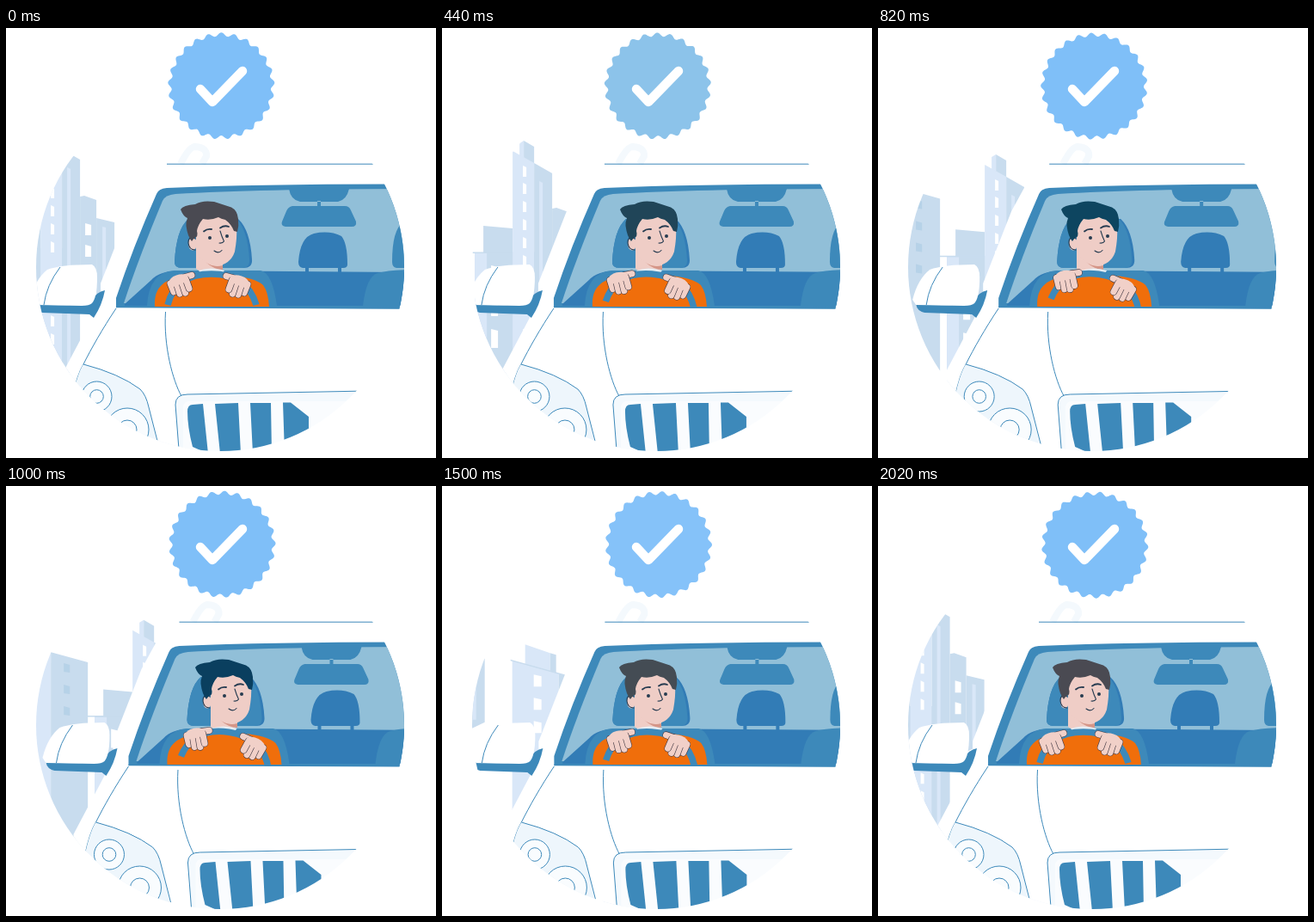
Animation, 500 px wide and 500 px high, one loop 2.04 s. Source, as an HTML page:

```html
<!DOCTYPE html>
<html lang="en">
<head>
<meta charset="utf-8">
<title>Verified driver</title>
<style>
  html, body { margin: 0; width: 100%; height: 100%; overflow: hidden; background: #fff; }
  svg { display: block; width: 100%; height: 100%; }
  .blue { fill: #3d89ba; }
  .deep { fill: #327cb6; }
  .light { fill: #d9e7f8; }
  .shade { fill: #c8dcee; }
  .skin { fill: #efcdc6; }
  .white { fill: #fff; }
  .line { fill: none; stroke: #3d89ba; stroke-width: 1; }
  .ink { fill: none; stroke: #263b50; stroke-width: 1.1; stroke-linecap: round; stroke-linejoin: round; }
  .brow { stroke-width: 1.8; }
</style>
</head>
<body>
<svg viewBox="0 0 500 500">
  <defs>
    <clipPath id="disc"><circle cx="249" cy="278" r="214"/></clipPath>
    <g id="hand"></g>
  </defs>

  <g clip-path="url(#disc)">
    <g id="city"></g>

    <g id="car">
      <path class="white" d="M187 158L161 180L143 213L110 297V306L101 335L64 405V500H520V158Z"/>
      <path d="M203 158Q213 138 220 138Q234 139 233 149L228 158" fill="none" stroke="#f4f9fd" stroke-width="8"/>
      <path class="line" d="M187 158.2H460"/>

      <!-- windscreen and cabin -->
      <path class="blue" d="M128 325V314Q148 254 175 193Q177 187 187 186Q300 181 480 181.5V326.5Z"/>
      <path fill="#91bfd8" d="M137 320Q154 268 182 201Q185 194 197 193Q300 187 480 187V300L200 321Z"/>
      <path class="deep" d="M138 321L169 293Q178 283 200 282L480 284V323H138Z"/>
      <path class="blue" d="M164 323Q166 284 196 282H296Q310 285 315 323Z"/>
      <path class="blue" d="M415 323Q419 289 432 285Q446 281 480 281V325Z"/>
      <path class="deep" d="M196 272Q198 234 212 222H270Q284 235 286 269Q287 279 276 279H204Q196 279 196 272Z"/>
      <path class="blue" d="M196 272Q198 234 212 222H268Q281 235 283 269Q284 279 274 279H204Q196 279 196 272Z"/>
      <path class="deep" d="M340 272Q342 243 358 239Q376 235 390 242Q397 250 397 275Q397 279 392 279H345Q340 278 340 272ZM348 278h4v6h-4ZM386 278h4v6h-4Z"/>
      <path class="blue" d="M329 187Q331 200 342 202H386Q396 200 399 187ZM362 201h4v8h-4ZM333 207H394Q399 207 401 212L407 225Q408 231 402 231H325Q319 230 321 225L326 213Q328 208 333 207Z"/>
      <path class="blue" d="M449 272Q449 234 462 226H480V279H454Q449 278 449 272Z"/>

      <!-- driver -->
      <path fill="#f06e0b" d="M173 324Q172 306 182 298Q190 290 215 288H262Q289 290 299 299Q305 307 306 324Z"/>
      <g id="head">
        <path class="skin" d="M221 245V280Q237 291 252 280V270Z"/>
        <path fill="#d59688" d="M232 272Q241 279 252 276V281Q242 281 232 272Z"/>
        <path class="skin" d="M221 221V260Q228 274 245 276.5Q261 275 266 260Q269 243 268 233L262 217Z"/>
        <ellipse class="skin" cx="217" cy="251" rx="5" ry="7.5"/>
        <path class="ink" d="M220 245Q212 241 212 250Q213 258 220 258"/>
        <path id="hair" d="M203 211Q206 206 220 205Q228 200 242 202L262 208.5Q269 212 270 222Q271 230 269 237L265 236Q262 228 255 223Q250 222 247 220Q238 224 229 222Q223 229 222 236Q224 243 219 244L216 248Q211 242 209.5 230Q209 226 211 221Q206 219 203 211Z"/>
        <path class="ink brow" d="M230 236.5Q234 233 239 234M249 232.5Q254 229 259 231"/>
        <path class="ink" d="M249 236Q251 243 253.5 248Q252 250.5 248 250M242 259Q247 263 251 258.5"/>
        <g fill="#263b50"><circle cx="237" cy="244" r="2"/><circle cx="257" cy="242" r="2"/></g>
      </g>
      <path fill="#e6edf3" d="M224 282Q238 277 254 282L250 287H228Z"/>
      <g id="wheel">
        <path d="M188 322Q197 286 239 286Q280 286 291 322" fill="none" stroke="#3d89ba" stroke-width="7.5"/>
        <use href="#hand"/>
        <use href="#hand" transform="matrix(-1 0 0 1 472 1)"/>
      </g>

      <!-- bonnet -->
      <path class="white" d="M128 325L480 326.5V500H60V420Q92 380 128 325Z"/>
      <path d="M128 324.5L480 326" stroke="#3d89ba" stroke-width="1.5"/>
      <path class="line" d="M128 326C112 350 99 373 90 391Q83 402 77 430M185.5 330C183 370 194 410 204 428"/>
      <path fill="#f4f9fd" d="M201 500L197 438Q198 426 212 426L420 422V500Z"/>
      <path class="line" d="M201 490L197 438Q197 426 211 426L420 422"/>
      <path class="white" d="M206 500V442Q206 434 214 434H400V500Z" opacity=".6"/>
      <path class="blue" d="M217 438L229 437L235 495L217 487Q211 464 211 446Q211 438 217 438ZM243 437L270 436L273 495H249ZM284 436H308L309 495H287ZM322 435.5H331L352 452V495H324Z"/>

      <!-- headlamp -->
      <path fill="#eef6fc" d="M90 391Q132 402 156 420Q163 427 166 441L177 490L74 500L77 430Q83 402 90 391Z"/>
      <path class="line" d="M90 391Q132 402 156 420Q163 427 166 441L177 484"/>
      <g class="line" style="fill:#f9fcfe">
        <circle cx="141" cy="467" r="25"/><circle cx="141" cy="467" r="11"/>
        <circle cx="105.5" cy="428.5" r="17.5"/><circle cx="105.5" cy="428.5" r="7.8"/>
      </g>

      <!-- side mirror -->
      <path class="blue" d="M32 321Q68 324 95 320L106 309Q110 306 115 305Q112 322 102 337L97 333L42 331Q33 329 32 321Z"/>
      <path class="white" d="M28 316Q34 292 48 281Q64 275 100 275Q106 278 106 290Q106 313 100 320Q97 323 88 323L32 322Z"/>
      <path class="line" d="M63 278Q47 299 44 322"/>
    </g>
  </g>

  <path id="badge"/>
  <path d="M226 71L240 86L275 50" fill="none" stroke="#fff" stroke-width="10.5" stroke-linecap="round" stroke-linejoin="round"/>
</svg>

<script>
const LOOP = 2040, CITY_SPAN = 267, SCALLOPS = 25;
const el = id => document.getElementById(id);
const smooth = p => (1 - Math.cos(Math.PI * Math.min(1, Math.max(0, p)))) / 2;
const linear = p => p;
const mix = (a, b, p) => a + (b - a) * p;

// Each key is [time, value]; a value may be a number or an rgb array.
function track(keys, t, ease = smooth) {
  const i = Math.max(1, keys.findIndex(k => k[0] >= t));
  const [t0, a] = keys[i - 1], [t1, b] = keys[i];
  const p = ease((t - t0) / (t1 - t0));
  return Array.isArray(a) ? a.map((v, n) => mix(v, b[n], p)) : mix(a, b, p);
}
const rgb = c => `rgb(${c.map(Math.round)})`;

const cityKeys = [[0, 0], [440, 42], [820, 84], [1000, 107], [1340, 162], [1660, 219], [LOOP, CITY_SPAN]];
const headKeys = [[0, 0], [200, 0], [440, 4], [820, 10], [1000, 17], [1340, 6], [1660, 0], [LOOP, 0]];
const wheelKeys = [[0, 0], [200, 0], [440, 4.5], [820, 8], [1000, 8.5], [1340, 7], [1660, 0], [LOOP, 0]];
const hairKeys = [[0, [74, 74, 82]], [440, [32, 69, 88]], [820, [13, 69, 96]], [1000, [10, 63, 95]],
  [1340, [42, 70, 83]], [1660, [94, 82, 84]], [LOOP, [74, 74, 82]]];
const badgeKeys = [[0, [127, 191, 248]], [440, [140, 195, 234]], [820, [127, 191, 248]],
  [1340, [127, 191, 248]], [1660, [138, 197, 249]], [LOOP, [127, 191, 248]]];

// Buildings are drawn where they stand once the city has moved by `at`.
const shape = (cls, d) => `<path class="${cls}" d="${d}"/>`;
const windows = (x, w, h, ys) => ys.map(y => shape('white', `M${x} ${y}l${w} 2v${h}h${-w}Z`)).join('');
const buildings = [
  { at: 42, slope: .1, art:
    shape('shade', 'M48 230L82 233V263H48ZM38 261H108V480H38Z') +
    shape('light', 'M38 262H52V480H38Z') +
    shape('shade', 'M29 260.5H108V262H29Z') + windows(57, 8, 20, [276, 313, 350]) },
  { at: 0, slope: .33, art:
    shape('shade', 'M105 221L126 226V300L105 310Z') +
    shape('light', 'M112 231l4 1v65h-4Z') +
    shape('shade', 'M86 196L91 195L105 200V300H86Z') + windows(92, 7, 12, [227, 252, 277]) },
  { at: 42, slope: .38, art:
    shape('light', 'M90 134L95 131V152L90 150Z') + shape('shade', 'M95 131L107 138V160L95 152Z') +
    shape('light', 'M82 143L107 157V480H82Z') + shape('shade', 'M107 157L128 169V480H107Z') +
    windows(94, 4, 11, [160, 180, 201, 222, 243, 264, 350, 371]) +
    shape('light', 'M113 178l4 2v270h-4Z') },
  { at: 162, slope: .29, art:
    shape('light', 'M68 176L97 186V212L68 204Z') + shape('shade', 'M97 186L104 188V214L97 212Z') +
    shape('light', 'M53 195L107 210V480H53Z') + shape('shade', 'M107 210L150 222V480H107Z') +
    shape('shade', 'M51 193.5L150 221V222.5L51 195Z') +
    windows(78, 9, 12, [211, 238, 265, 340, 369]) +
    `<g opacity=".12">${[222, 247, 272, 297].map(y => shape('blue', `M122 ${y}l7 2v9l-7-1Z`)).join('')}</g>` },
];

const movers = [];
for (const b of buildings) for (const turn of [-1, 0, 1]) {
  const g = document.createElementNS('http://www.w3.org/2000/svg', 'g');
  g.innerHTML = b.art;
  el('city').append(g);
  movers.push({ g, slope: b.slope, offset: turn * CITY_SPAN - b.at });
}

// A fist over the rim: outlined strokes for fingers and thumb, then the back of the hand.
const fingers = ['M207 290L216 287.5', 'M191 297L195 307', 'M197 293L202 309', 'M203 291L208.5 308', 'M209 292L213 303'];
const stroke = (d, color, width) =>
  `<path d="${d}" fill="none" stroke="${color}" stroke-width="${width}" stroke-linecap="round"/>`;
el('hand').innerHTML = fingers.map(d => stroke(d, '#4a3f48', 8.4) + stroke(d, '#f1d0c8', 7.1)).join('') +
  '<path d="M188 298Q190 290 198 287.5Q206 285 211 288L212 294L203 298L192 302Z" fill="#f1d0c8"/>';

let outline = '';
for (let i = 0; i < 360; i++) {
  const a = i * Math.PI / 180, r = 59.9 + 2.2 * Math.cos(SCALLOPS * a);
  outline += `${i ? 'L' : 'M'}${(r * Math.sin(a)).toFixed(2)} ${(-2.2 - r * Math.cos(a)).toFixed(2)}`;
}
el('badge').setAttribute('d', outline + 'Z');

const place = (node, value) => node.setAttribute('transform', value);

function draw(t) {
  const sway = 14.5 * (smooth((t - 260) / 760) - smooth((t - 1060) / 600));
  const city = track(cityKeys, t, linear);
  for (const { g, slope, offset } of movers) {
    const x = city + offset;
    place(g, `translate(${x} ${x * slope})`);
    g.style.display = Math.abs(x) > 180 ? 'none' : '';
  }
  place(el('car'), `translate(${sway} 0)`);
  place(el('head'), `translate(${track(headKeys, t) - sway} 0)`);
  place(el('wheel'), `rotate(${track(wheelKeys, t)} 240 325)`);
  place(el('badge'), `translate(250.3 69.6) rotate(${64 * t / LOOP})`);
  el('hair').setAttribute('fill', rgb(track(hairKeys, t)));
  el('badge').setAttribute('fill', rgb(track(badgeKeys, t)));
}

const start = performance.now();
function tick() {
  draw((performance.now() - start) % LOOP);
  requestAnimationFrame(tick);
}
draw(0);
requestAnimationFrame(tick);
</script>
</body>
</html>
```
